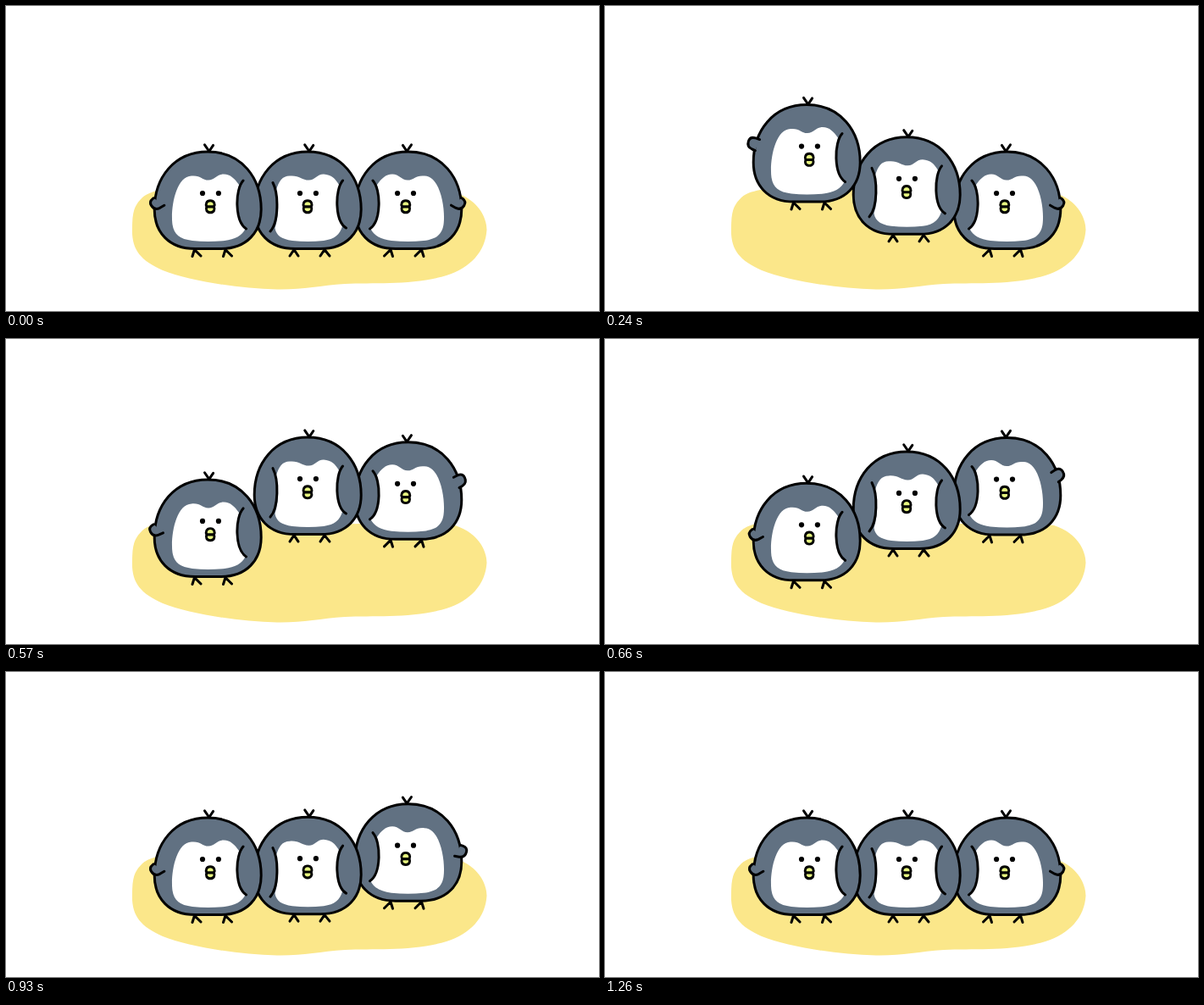
Animation of 700x360 px, one loop 1.65 s. Source, as an HTML page:

```html
<!DOCTYPE html>
<html lang="en">
<head>
<meta charset="utf-8">
<title>Three hopping penguins</title>
<style>
html, body { margin: 0; width: 100%; height: 100%; overflow: hidden; background: #fff; }
svg { display: block; }
.line { fill: none; stroke: #000; stroke-width: 3; stroke-linecap: round; stroke-linejoin: round; }
.gray { fill: #617182; }
.beak { fill: #e6f57f; stroke-width: 2.9; }
</style>
</head>
<body>
<svg width="700" height="360" viewBox="0 0 700 360">
  <defs>
    <path id="body" class="line gray" d="M0 172C40 172 63 203 63 240C63 267 46 286.500 15 286.500H-15C-46 286.500 -63 267 -63 240C-63 203 -40 172 0 172Z"/>
    <g id="face">
      <circle cx="-9.3" cy="221" r="3.1"/><circle cx="9.6" cy="221" r="3.1"/>
    </g>
    <g id="beak" class="line beak">
      <path d="M-4.200 237C-6 234 -4.500 229.700 0 229.700C4.500 229.700 6 234 4.200 237Z"/>
      <path d="M-4.200 237C-5.700 240 -4.500 243.800 0 243.800C4.500 243.800 5.700 240 4.200 237Z"/>
    </g>
    <path id="tuft" class="line" d="M-5.300 163.800L0 171.500L4.800 164.400"/>
    <g id="side">
      <path class="line" d="M220 295.500L222.500 287.500L230 295M256.500 295.500L259 287.500L266.500 295"/>
      <use href="#body" x="238.200"/>
      <use href="#tuft" x="239.800"/>
      <path fill="#fff" d="M196.500 258C194 240 200 201 219 200.500C230 199.500 231 205.500 239 205.500C246 205.500 249 198.500 257 198.500C265 198.500 270 204 275 211C271 228 273 250 282.500 263C279 271 270 275.500 258 277Q238 279 220 277C205 275 198.500 270 196.500 258Z"/>
      <path class="line" d="M280 206C270 217 270 254 283.500 263"/>
      <use href="#face" x="241.300"/>
      <use href="#beak" x="241.200"/>
    </g>
  </defs>
  <path fill="#fbe78a" d="M149 262C149 240 153 234 161 226C176 212 220 213 300 216C390 222 480 214 530 220C552 227 567 244 567.500 264C566 290 548 309 520 318C480 330 435 326 400 328C370 330 350 335 320 334.500C270 333 215 324 185 312C158 300 148 287 149 262Z"/>
  <g id="right"><use href="#side"/><path class="line gray"/></g>
  <g id="middle">
    <path class="line" d="M335 295L340 287.500L345 295M371 295L376 287.500L382 295"/>
    <use href="#body" x="356.200"/>
    <use href="#tuft" x="358"/>
    <path fill="#fff" d="M319 217C322 207 326 200.500 335 200.500C346 199.500 349 205.500 357.500 205.500C365 205.500 367 198.500 375 198.500C384 199 389 204 393 211C389 228 389 247 397 260C394 270 388 275 375 277Q356 279 338 277C325 275 319 271 317.500 262C322 248 322 232 319 217Z"/>
    <path class="line" d="M315 208.500C322 222 322 255 312 266M397.500 206C388 217 388 254 401.500 262"/>
    <use href="#face" x="356.300"/>
    <use href="#beak" x="356"/>
  </g>
  <g id="left"><use href="#side"/><path class="line gray"/></g>
</svg>
<script>
const LOOP = 1650, STEP = 30, HEIGHT = 56;
const birds = [
  { id: 'left', delay: 0, flip: '', arm: { x: 192, y: 223, reach: 24, swing: 52 } },
  { id: 'middle', delay: 210, flip: '' },
  { id: 'right', delay: 420, flip: ' translate(713 0) scale(-1 1)', arm: { x: 191, y: 224, reach: 22, swing: 67 } }
];
for (const bird of birds) bird.node = document.getElementById(bird.id);

// Jump height from 0 to 1: quick rise, short hang, soft landing
function hop(t) {
  if (t <= 0 || t >= 840) return 0;
  const rise = 1 - Math.max(0, 1 - t / 360) ** 4.2;
  const fall = 1 / (1 + (Math.max(0, t - 330) / 146) ** 4.25);
  return rise * fall;
}

function drawArm(node, { x, y, reach, swing }, h) {
  const tip = -reach;
  node.setAttribute('d', `M${tip + 7 + 5 * h} -6.5H${tip + 6}Q${tip} -6 ${tip} -0.5` +
    `Q${tip} 6.500 ${tip + 7} 7.200L${tip + 13 - 2 * h} 7.500`);
  node.setAttribute('transform', `translate(${x} ${y}) rotate(${swing * h - 33})`);
}

function render(now) {
  const t = Math.floor(now % LOOP / STEP) * STEP;
  for (const { node, delay, flip, arm } of birds) {
    const h = hop(t - delay);
    node.setAttribute('transform', `translate(0 ${-HEIGHT * h})${flip}`);
    if (arm) drawArm(node.lastElementChild, arm, h);
  }
}

const start = performance.now();
(function frame() {
  render(performance.now() - start);
  requestAnimationFrame(frame);
})();
</script>
</body>
</html>
```
